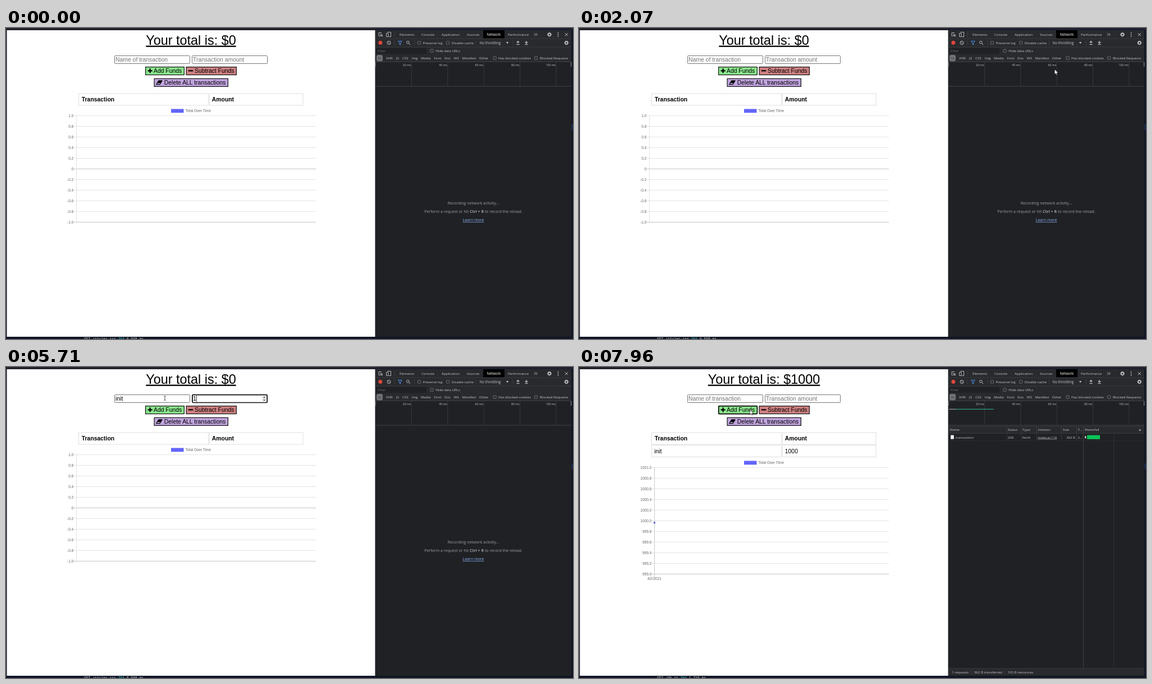
An HTML page that plays this animation: 1010x555 px, repeating every 8000 ms.

```html
<!DOCTYPE html>
<html lang="en">
<head>
<meta charset="utf-8">
<title>Budget tracker</title>
<style>
  html, body { margin: 0; width: 100%; height: 100%; overflow: hidden; background: #0d1220; }
  svg { display: block; width: 1010px; height: 555px; }
  text { white-space: pre; }
  .page { font-family: "Liberation Sans", Arial, sans-serif; }
  .dev { font-family: "Open Sans", "Noto Sans", sans-serif; }
  .mono { font-family: "Liberation Mono", "DejaVu Sans Mono", monospace; }
</style>
</head>
<body>
<svg id="stage" viewBox="0 0 1010 555" xmlns="http://www.w3.org/2000/svg"></svg>
<script>
const LOOP = 8000, STEP = 77.5, OFFSET = 200;
const CLICK_ADD = 7255, SAVED = 7410, CHART_START = 7400;

// Markup helpers
const rect = (x, y, w, h, fill, more = '') =>
  `<rect x="${x}" y="${y}" width="${w}" height="${h}" fill="${fill}" ${more}/>`;
const box = (x, y, w, h, fill, stroke, sw = 1, rx = 0) =>
  rect(x, y, w, h, fill, `stroke="${stroke}" stroke-width="${sw}" rx="${rx}"`);
const text = (x, y, str, size, fill, more = '') =>
  `<text x="${x}" y="${y}" font-size="${size}" fill="${fill}" ${more}>${str}</text>`;
const path = (d, stroke, sw = 1, fill = 'none') =>
  `<path d="${d}" stroke="${stroke}" stroke-width="${sw}" fill="${fill}"/>`;
const group = (id, body, more = '') => `<g id="${id}" ${more}>${body}</g>`;
const END = 'text-anchor="end"', MID = 'text-anchor="middle"';

// Web page
const BODY = 10.4, GREY = '#757575';

function field(id, x, hint) {
  return box(x + .5, 49.5, 134, 14, '#fff', '#767676', 1, 1) +
    group(id + 'Ring', box(x + 1, 49.7, 133.2, 13.8, '#fff', '#101010', 1.7, 1.5)) +
    text(x + 2, 60, hint, BODY, GREY, `id="${id}Hint"`) +
    text(x + 2, 60, '', BODY, '#000', `id="${id}Text"`) +
    rect(x + 2, 51, .8, 11.5, '#000', `id="${id}Caret"`);
}

function button(x, y, w, fill, label, labelX) {
  return box(x + .6, y + .6, w - 1.2, 14, fill, '#111', 1.2) +
    text(labelX, y + 11.2, label, BODY, '#000');
}

function cells(y) {
  return box(129.5, y, 231, 21, '#fff', '#dedede') + box(362.5, y, 166.5, 21, '#fff', '#dedede');
}

function chart(top, axisX, max, shift, darkRows) {
  let out = rect(294, top - 12, 22.5, 6.8, '#6265fb') +
    text(319.5, top - 6.3, 'Total Over Time', 6.5, '#666');
  for (let i = 0; i <= 10; i++) {
    const y = top + 19 * i;
    const label = shift ? (max - i * .2).toFixed(1) : i === 5 ? '0' : (max - i * .2).toFixed(1);
    out += path(`M${axisX - 5} ${y}H552`, darkRows.includes(i) ? '#c4c4c4' : '#e4e4e4') +
      text(axisX - 5.3, y + 2.1, label, 6.5, '#666', END);
  }
  return out + path(`M${axisX} ${top}V${top + 190 + (shift ? 5 : 0)}`, shift ? '#c9c9c9' : '#e0e0e0');
}

const pageMarkup = rect(1.5, 4, 656, 547, '#fff') +
  text(329.5, 29.5, 'Your total is: $0', 23.4, '#000', `id="total" ${MID} text-decoration="underline"`) +
  field('name', 193, 'Name of transaction') +
  field('amount', 331, 'Transaction amount') +
  group('spinner', rect(456, 51.2, 8, 11, '#f0f0f0') +
    path('M457.8 55.2L460 52.6L462.2 55.2ZM457.8 58.2L460 60.8L462.2 58.2Z', 'none', 0, '#555')) +
  button(248, 69, 70, '#8ae68c', 'Add Funds', 263) +
  group('addRing', box(248.7, 69.7, 68.8, 14, 'none', '#101010', 1.7, 1.6)) +
  path('M252.6 76.3H260.6M256.6 72.3V80.3', '#000', 2.2) +
  button(320.5, 69, 90.5, '#cd8081', 'Subtract Funds', 336) +
  path('M324.8 76.3H333.2', '#000', 2.2) +
  button(263.5, 89.8, 132.5, '#bfa3dd', 'Delete ALL transactions', 281.8) +
  path('M271.8 94H278L274 100.6H267.8Z', '#000', 1.1) +
  path('M271.8 94H278L275.6 97.9H269.4Z', '#000', .6, '#000') +
  cells(117) +
  text(134.8, 130.8, 'Transaction', BODY, '#000', 'font-weight="bold"') +
  text(366.8, 130.8, 'Amount', BODY, '#000', 'font-weight="bold"') +
  group('emptyChart', chart(156.5, 125.5, 1, false, [5, 10])) +
  group('filledChart', cells(139.5) +
    text(134, 153.6, 'init', BODY, '#000') + text(366.8, 153.6, '1000', BODY, '#000') +
    chart(179.5, 134.5, 1001, true, [10]) +
    text(134.3, 380.4, '4/2/2021', 6.5, '#666', MID) +
    '<circle id="dot" cx="134.4" r="1.8" fill="#6265d8"/>');

// Developer tools
const INK = '#c3c6c9', DIM = '#9aa0a6', LINE = '#3d3f42', BAR = '#292a2d', PANE = '#202124';
const tool = (x, y, str, fill = INK, size = 6.15, more = '') => text(x, y, str, size, fill, more);
const row = (y, items) => Object.entries(items).map(([str, x]) => tool(x, y, str)).join('');
const check = (x, y) => box(x + .5, y - 2.5, 5.2, 5.2, 'none', '#7c7f83', .8, .8);
const vline = (x, y0, y1, color = LINE) => path(`M${x} ${y0}V${y1}`, color, .8);
const hline = (y, color = LINE) => path(`M658 ${y}H1007`, color, .8);
const gear = (x, y) =>
  `<circle cx="${x}" cy="${y}" r="2.3" fill="none" stroke="${INK}" stroke-width="1.6"/>` +
  `<circle cx="${x}" cy="${y}" r="3.4" fill="none" stroke="${INK}" stroke-width="1" stroke-dasharray="1.3 1.37"/>`;

const tabs = rect(850, 4, 38, 14.6, '#000') +
  path('M669 8.5H664V14.5H666M667 11L671 12.8L669 13.3L670.8 15.6M667 11L667.8 15L669 13.3', INK, .9) +
  path('M679.5 8V7.5H685.5V15.5H682M677.6 9.5H681V15.5H677.6Z', INK, .9) +
  vline(692, 7, 17) +
  row(14.2, { Elements: 701, Console: 740, Application: 776, Sources: 821, Performance: 894 }) +
  tool(856.5, 14.2, 'Network', '#fff', 6.25) +
  path('M941 9.3L943.3 11.6L941 13.9M944 9.3L946.3 11.6L944 13.9', INK, .9) +
  gear(968, 11.7) +
  [8.7, 11.7, 14.7].map(y => `<circle cx="983.5" cy="${y}" r=".9" fill="${INK}"/>`).join('') +
  path('M995.8 9.2L1000.8 14.2M1000.8 9.2L995.8 14.2', INK, 1);

const controls = '<circle cx="666.8" cy="26.3" r="3.5" fill="#e2483d"/>' +
  `<circle cx="682" cy="26.4" r="3.1" fill="none" stroke="${INK}" stroke-width=".9"/>` +
  path('M679.9 24.3L684.1 28.5', INK, .9) + vline(692, 22, 31) +
  path('M698.3 23.4H705.3L702.6 26.8V30L701 29V26.8Z', '#4e8fe8', 1) +
  `<circle cx="715.8" cy="25.6" r="2.3" fill="none" stroke="${INK}" stroke-width=".9"/>` +
  path('M717.5 27.4L720.3 30.1', INK, 1) + vline(728, 22, 31) +
  check(732.8, 26.3) + check(784, 26.3) +
  row(28.7, { 'Preserve log': 742.5, 'Disable cache': 793.8 }) + vline(837.5, 22, 31) +
  tool(843.5, 28.7, 'No throttling', INK, 6.35) +
  path('M891 25H895.2L893.1 28.2Z', 'none', 0, INK) + vline(903, 22, 31) +
  path('M912 28V24M909.6 25.9L912 23.5L914.4 25.9M909.2 29.5H914.8', INK, 1.1) +
  path('M927 23V27M924.6 25.1L927 27.5L929.4 25.1M924.2 29.5H929.8', INK, 1.1) +
  gear(998.3, 26.4);

const filters = rect(659, 35.5, 90, 10.5, PANE) + tool(662, 43, 'Filter', '#6b6f73') +
  check(755.5, 40.6) + tool(765.3, 43, 'Hide data URLs') +
  rect(660, 48, 11, 11.6, '#707276', 'rx="3"') + tool(662.3, 56.2, 'All', '#3a3c40', 5.6) +
  row(56.3, { XHR: 677, JS: 695, CSS: 706, Img: 722.7, Media: 739, Font: 762.5, Doc: 781,
    WS: 797.8, Manifest: 812.5, Other: 842.7, 'Has blocked cookies': 877, 'Blocked Requests': 951 }) +
  check(867.5, 53.5) + check(941, 53.5);

let timeline = rect(658, 60.5, 349, 490.5, PANE) + hline(60.2, '#494b4e') + hline(104, '#4b4d50');
for (let i = 1; i <= 5; i++) {
  const x = 658 + 64.4 * i;
  timeline += vline(x, 60.5, 104) + tool(x - 1, 68, i * 20 + ' ms', INK, 5.2, END);
}
timeline += rect(657.5, 61, 1.2, 8, '#85888c') + rect(1006, 61, 1.2, 8, '#85888c');

const hint = tool(832.5, 315.2, 'Recording network activity…', DIM, 7.03, MID) +
  tool(832.5, 330.2, 'Perform a request or hit <tspan font-weight="bold">Ctrl + R</tspan> to record the reload.', DIM, 7.03, MID) +
  tool(832.5, 345.4, 'Learn more', '#8ab4f8', 7.03, MID + ' text-decoration="underline"');

const requests = path('M659 75.3H671', '#b8babd', 1) + path('M671 75.3H738.5', '#2d9d86', 1.2) +
  rect(658, 106, 349, 12.3, BAR) + hline(106) + hline(118.3) +
  [762, 788.5, 815.5, 859.5, 886.5].map(x => vline(x, 106, 131.5)).join('') +
  vline(898.6, 106, 538, '#4b4d50') + vline(952.5, 118.3, 538, '#323437') +
  row(114.4, { Name: 660.5, Status: 763.7, Type: 790, Initiator: 817.5, Size: 861.8, 'T…': 888.5, Waterfall: 900.8 }) +
  path('M997 113.8H1001.4L999.2 110.2Z', 'none', 0, DIM) +
  rect(662, 121.6, 5.8, 7, '#f4f4f4') +
  row(127.5, { transaction: 670.8, 200: 763.7, fetch: 790, '2…': 888.5 }) +
  tool(817.3, 127.5, 'index.js:116', INK, 6.15, 'text-decoration="underline"') +
  tool(884, 127.5, '362 B', INK, 6.15, END) + hline(131.5, '#2c2e31') +
  rect(901.2, 123.3, 2, 4, '#e6e6e6') + rect(905, 121.6, 23, 7.2, '#0ac557') +
  rect(658, 538, 349, 13, BAR) + hline(538) +
  row(546.6, { '1 requests': 664, '362 B transferred': 703.8, '103 B resources': 763.5 }) +
  vline(698.6, 541, 548) + vline(758.4, 541, 548);

const devMarkup = rect(658, 4, 349, 547, BAR) + tabs + hline(19) + controls + hline(34) + filters + timeline +
  group('hint', hint) + group('requests', requests) +
  group('tip', rect(844.8, 38, 29, 8, '#2b2b2b', 'stroke="#5a5a5a" stroke-width=".4"') +
    tool(845.8, 44.2, 'Throttling', '#e8e8e8', 5.7));

// Desktop edges and the terminal line below the window
const log = (id, url, code, time) => group(id,
  text(139, 557, `GET ${url} <tspan fill="#3fc4d4">${code}</tspan> ${time} ms`, 6.32, '#c8ccd4'), 'class="mono"');
const desk = rect(0, 0, 1010, 555, '#101625') + rect(0, 0, 657, 4, '#22222b') + rect(657, 0, 353, 4, '#1c2030') +
  rect(1007.5, 172, 2.5, 10, '#1b2c52') +
  log('logOld', '/styles.css', 304, '0.808') + log('logNew', '/db.js', 304, '1.716');

const pointer = '<circle id="glow" r="5.2" fill="#ffee00" opacity=".62"/>' +
  group('arrow', path('M0 0V9L2.1 7.1L3.5 10.2L4.9 9.6L3.5 6.6H6.3Z', '#000', .5, '#fff')) +
  group('beam', path('M-1.8 -3.8Q0 -3.8 0 -3Q0 -3.8 1.8 -3.8M0 -3V3M-1.8 3.8Q0 3.8 0 3Q0 3.8 1.8 3.8', '#222', .8));

const stage = document.getElementById('stage');
stage.innerHTML = desk + group('page', pageMarkup, 'class="page"') +
  group('dev', devMarkup, 'class="dev"') + group('pointer', pointer);

const ui = {};
stage.querySelectorAll('[id]').forEach(el => ui[el.id] = el);
const show = (id, on) => ui[id].style.display = on ? '' : 'none';
const between = (t, a, b) => t >= a && t < b;

// Pointer route: time, x, y
const route = [
  [205, 952, 531], [282, 938, 492], [355, 921, 451], [515, 928, 430], [600, 962, 300], [680, 992, 170],
  [760, 997, 85], [840, 955, 42], [920, 870, 30], [1000, 798, 28], [1130, 835, 29], [1210, 850, 30],
  [1840, 850, 30], [1990, 898, 58], [2070, 840, 76], [2220, 520, 78], [2380, 240, 62], [2450, 200, 57],
  [2595, 270, 56], [3070, 270, 56], [3300, 283, 55.5], [6640, 283, 55.5], [6850, 285, 62],
  [7080, 289, 80], [7255, 285, 78], [7410, 285, 78], [7950, 304.5, 76]
];

function locate(t) {
  const i = route.findIndex(p => p[0] > t);
  if (i === 0) return route[0].slice(1);
  if (i < 0) return route[route.length - 1].slice(1);
  const [t0, x0, y0] = route[i - 1], [t1, x1, y1] = route[i];
  const k = (t - t0) / (t1 - t0);
  return [x0 + (x1 - x0) * k, y0 + (y1 - y0) * k];
}

const keys = {
  name: { word: 'init', at: [4080, 4310, 4480, 4630], x: 195 },
  amount: { word: '1000', at: [5710, 5940, 6020, 6190], x: 333 }
};

function drawField(id, t, focused, caretOn) {
  const { word, at, x } = keys[id];
  const count = t < SAVED ? at.filter(k => t >= k).length : 0;
  const label = ui[id + 'Text'];
  const value = word.slice(0, count);
  if (label.textContent !== value) label.textContent = value;
  show(id + 'Hint', !count);
  show(id + 'Ring', focused);
  show(id + 'Caret', focused && caretOn);
  ui[id + 'Caret'].setAttribute('x', x + (count ? label.getComputedTextLength() : 0));
}

function render(t) {
  const q = OFFSET + STEP * Math.floor((t - OFFSET) / STEP);
  const saved = t >= SAVED;

  drawField('name', t, between(t, 2840, 5330), !between(t, 3380, 3930) && t < 5180);
  const inAmount = between(t, 5330, CLICK_ADD);
  drawField('amount', t, inAmount, t < 6720);
  show('spinner', inAmount);
  show('addRing', t >= CLICK_ADD);

  const total = 'Your total is: $' + (saved ? 1000 : 0);
  if (ui.total.textContent !== total) ui.total.textContent = total;
  show('emptyChart', !saved);
  show('filledChart', saved);
  show('hint', !saved);
  show('requests', saved);
  show('logOld', !saved);
  show('logNew', saved);

  const p = Math.min(1, Math.max(0, (q - CHART_START) / 1000));
  ui.dot.setAttribute('cy', 369 - 95 * (1 - (1 - p) ** 4));

  show('tip', between(t, 1285, 1915));
  ui.tip.setAttribute('opacity', Math.min(1, Math.max(0, (q - 1225) / 290)));

  const [x, y] = locate(q);
  const overField = y > 49 && y < 64 && (between(x, 193, 328) || between(x, 331, 466));
  show('pointer', t >= 205);
  ui.pointer.setAttribute('transform', `translate(${x} ${y})`);
  show('arrow', !overField);
  show('beam', overField);
  show('glow', between(t, 2835, 2925) || between(t, CLICK_ADD, SAVED));
}

const start = performance.now();
function tick() {
  render((performance.now() - start) % LOOP);
  requestAnimationFrame(tick);
}
tick();
</script>
</body>
</html>
```
